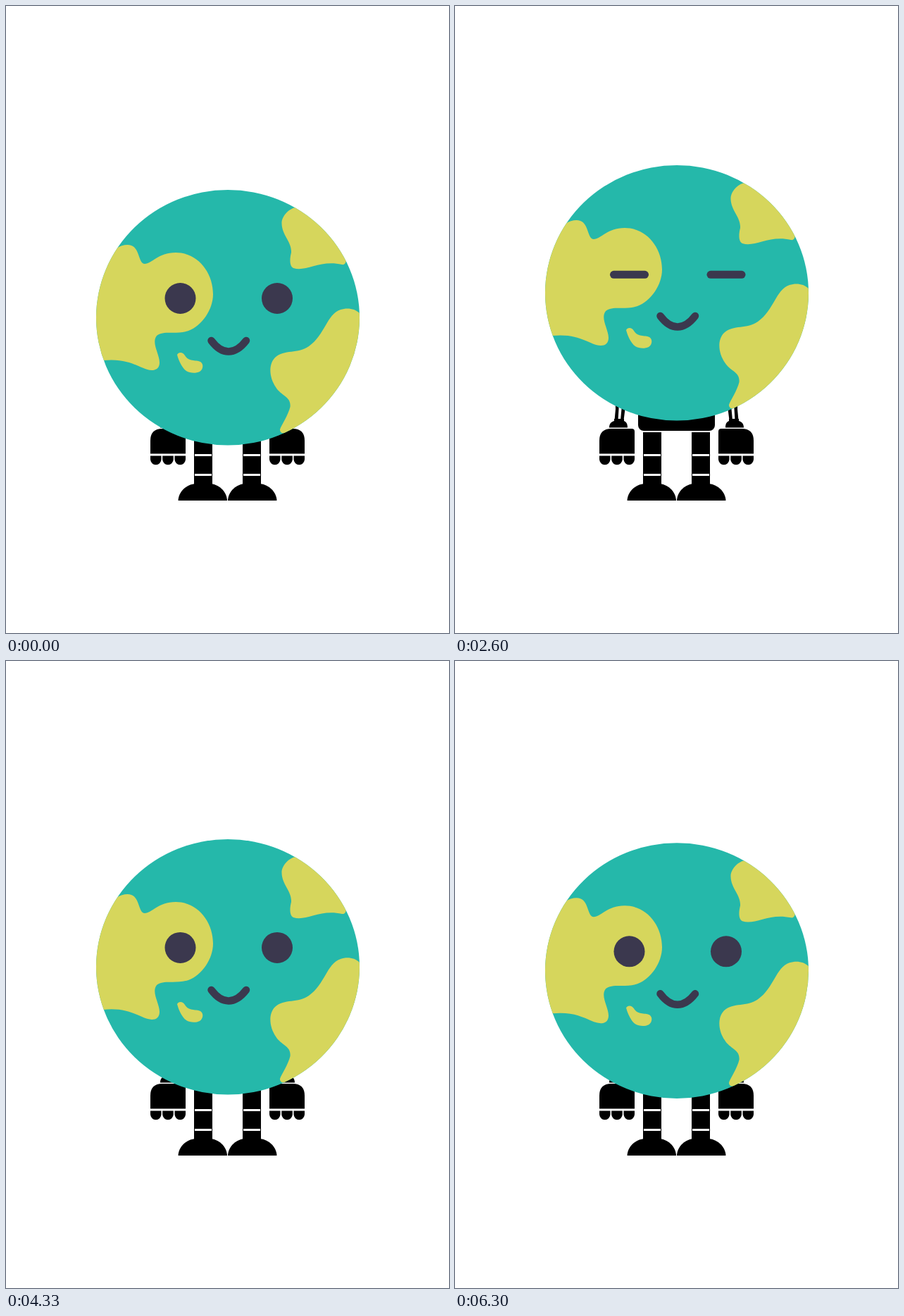
Animation of 629x890 px, one loop 6330 ms. Source, as an HTML page:

```html
<!DOCTYPE html>
<html lang="en">
<head>
<meta charset="utf-8">
<title>Bouncing globe</title>
<style>
  html, body { margin: 0; width: 100%; height: 100%; overflow: hidden; background: #fff; }
  svg { display: block; width: 100%; height: 100%; }
  .land { fill: #d6d65c; }
  .ink { fill: #3b384e; }
</style>
</head>
<body>
<svg viewBox="0 0 629 890">
  <defs>
    <clipPath id="disc"><ellipse cx="315" cy="442.3" rx="187" ry="181.3"/></clipPath>
    <g id="side">
      <!-- arm and wrist -->
      <path d="M227 540H232.5V572L231.5 588H226.5L228 572ZM237 540H243L241.5 572L239.5 588H235L236.5 572Z"/>
      <path d="M219 598.5C219 593 222 590 226 589V586H240V589C243 590 245 593 245 598.5Z"/>
      <!-- hand and fingers -->
      <path d="M205 635.5V617Q205 600 222 600H251Q255 600 255 604V635.5Z"/>
      <path id="finger" d="M205 638.5H220.5V643.5A7.75 7.75 0 0 1 205 643.5Z"/>
      <use href="#finger" x="17.2"/>
      <use href="#finger" x="34.5"/>
      <!-- leg and foot -->
      <path d="M267 605H293V680H267Z"/>
      <path d="M268 636H292V639H268ZM268 664H292V667H268Z" fill="#fff"/>
      <path d="M244.5 702C245 689 257 678 271 678H288C302 678 313.5 689 314 702Z"/>
    </g>
  </defs>

  <use href="#side"/>
  <use href="#side" transform="translate(629) scale(-1 1)"/>
  <rect x="260" y="540" width="109" height="63" rx="8"/>

  <g id="globe">
    <g clip-path="url(#disc)">
      <rect x="120" y="255" width="390" height="375" fill="#25b8aa"/>
      <g class="land">
        <path d="M100 360L157 344C164 339 173 338 178 340C190 344 188 366 197 366C207 366 216 350 241 350C272 350 294 378 294 409C294 431 278 454 259 461C241 467 223 460 214 468C206 478 218 494 218 506C218 514 213 517 207 517C190 516 178 499 138 503L100 510Z"/>
        <path d="M243 495C245 491 251 491 254 496C259 505 269 502 276 505C281 508 280 516 275 519C269 522 261 521 256 518C250 514 245 503 243 495Z"/>
        <path d="M411 286C401 288 391 299 391.5 309C392 326 406 335 405 350C403 358 402 369 408 372C426 378 445 360 477 367C481 368 483 364 483 360L520 340L440 260Z"/>
        <path d="M502 436C495 429 484 428 475 431C455 438 453 467 430 483C415 494 395 487 382 499C372 509 374 528 383 541C391 554 405 554 403.5 569C401 580 391 595 389 601C389 605 391 607 397 606L460 640L530 560V440Z"/>
      </g>
    </g>
    <rect class="eye ink"/>
    <rect class="eye ink"/>
    <path d="M291.5 475Q303 490.5 316 490.5Q329 490.5 341 475" fill="none" stroke="#3b384e" stroke-width="10.5" stroke-linecap="round"/>
  </g>
</svg>
<script>
  const LOOP = 6330, CYCLE = 53, RISE = 35;
  const globe = document.getElementById("globe");
  const eyes = [...document.querySelectorAll(".eye")];
  const eyeX = [247.5, 385];

  // [step, height from 0 to 13]; each bounce is linear, with a short hold on the second peak
  const bounce = [[0, 0], [1, 2], [12, 13], [25, 0], [38, 13], [39, 13], [52, 0]];
  // eye [width, height] by distance from the middle of the blink
  const blink = [[60, 10], [55, 11], [49, 26]];
  const OPEN = [44, 44];

  function heightAt(step) {
    const i = Math.max(1, bounce.findIndex(p => p[0] >= step));
    const [a, u] = bounce[i - 1], [b, v] = bounce[i];
    return (u + (v - u) * (step - a) / (b - a)) / 13;
  }

  function draw(ms) {
    // 25 poses a second, shown on a 30 per second clock
    const tick = Math.floor(ms * 0.03 + 0.11);
    const step = Math.floor(tick * 5 / 6) % CYCLE;
    globe.setAttribute("transform", `translate(0 ${-RISE * heightAt(step)})`);

    const [w, h] = blink[Math.floor(Math.abs(step % 26 - 13.5))] || OPEN;
    const cy = h < 20 ? 416.3 : 415;
    eyes.forEach((eye, i) => {
      const box = { x: eyeX[i] - w / 2, y: cy - h / 2, width: w, height: h, rx: h / 2 };
      for (const key in box) eye.setAttribute(key, box[key]);
    });
  }

  const start = performance.now();
  function frame() {
    draw((performance.now() - start) % LOOP);
    requestAnimationFrame(frame);
  }
  frame();
</script>
</body>
</html>
```
